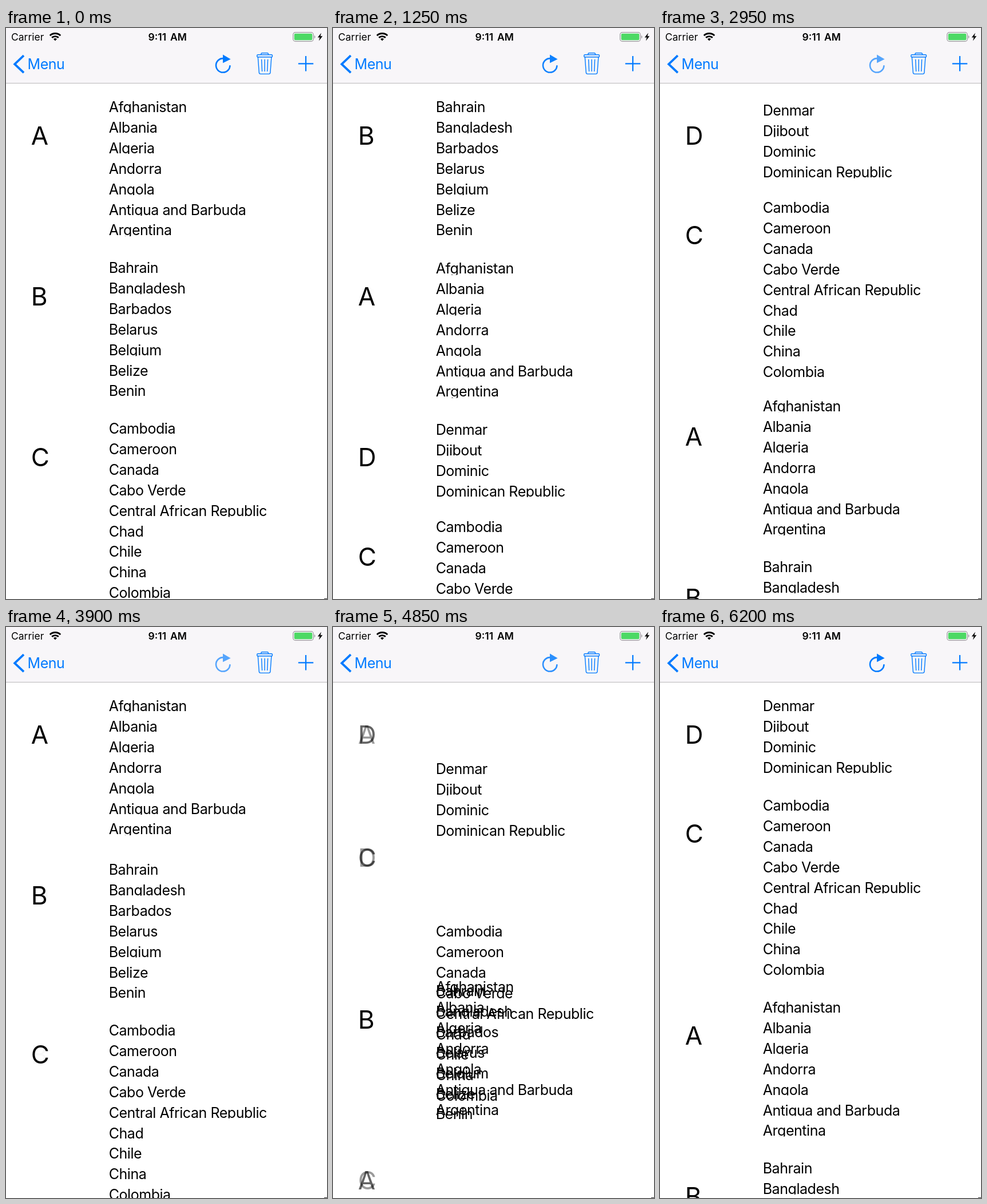
An HTML page that plays this animation: 561x998 px, repeating every 6.25 s.

```html
<!DOCTYPE html>
<html lang="en">
<head>
<meta charset="utf-8">
<title>Country list</title>
<style>
  html, body { margin: 0; width: 100%; height: 100%; overflow: hidden; background: #fff; }
  body { position: relative; color: #000; font-family: Inter, Roboto, sans-serif; }
  .section, .slot { position: absolute; top: 0; white-space: nowrap; }
  .section { left: 179.7px; }
  .section div {
    position: absolute; left: 0; height: 28.6px; overflow: hidden;
    font-size: 25px; line-height: 36px; letter-spacing: -.45px; padding-right: 2px;
  }
  .slot { left: 43.7px; font-size: 44px; line-height: 54px; }
  .slot span { position: absolute; left: 0; top: 0; }
  svg { position: absolute; left: 0; top: 0; }
</style>
</head>
<body>
<div id="table"></div>
<svg width="561" height="998" viewBox="0 0 561 998" fill="none">
  <rect width="561" height="96" fill="#f8f6f9"/>
  <rect y="96" width="561" height="1" fill="#b9b8ba"/>
  <rect x="556" y="997" width="5" height="1" fill="#333"/>

  <g fill="#000" font-size="17.5">
    <text x="9" y="21.8">Carrier</text>
    <text x="248.5" y="21.5" font-weight="600" word-spacing="2.5">9:11 AM</text>
  </g>
  <g stroke="#000" stroke-width="2.9">
    <path d="M76.8 13.2a13.2 13.2 0 0 1 18.4 0"/>
    <path d="M80.2 16.9a8.4 8.4 0 0 1 11.6 0"/>
    <path d="M83 19.3a4.4 4.4 0 0 1 6 0L86 22.5z" fill="#000" stroke="none"/>
  </g>
  <rect x="501.7" y="7.7" width="35.6" height="15.6" rx="4" stroke="#9b9b9d" stroke-width="1.2"/>
  <rect x="503.7" y="9.7" width="31.6" height="11.6" rx="2" fill="#4cd964"/>
  <path d="M538.8 12.8a3.2 3.2 0 0 1 0 5.6z" fill="#9b9b9d"/>
  <path d="M551 8.5l-6.3 8h3.7l-1.6 6 6.4-8.3h-3.8z" fill="#000"/>

  <g stroke="#007aff">
    <path d="M31 48.2L15.2 63.2L31 78.2" stroke-width="3.8"/>
    <text x="37.6" y="72" font-size="25" letter-spacing="-.5" fill="#007aff" stroke="none">Menu</text>
    <g id="refresh">
      <path d="M380 53.2A12.2 12.2 0 1 0 391.4 65.2" stroke-width="2.6"/>
      <path d="M379 46.6L392.6 54.4L379 61.2z" fill="#007aff" stroke="none"/>
    </g>
    <g stroke-width="1.4">
      <rect x="438.7" y="46.8" width="26.8" height="4" rx="1.5"/>
      <path d="M445.8 46.8v-1.3q0-1.8 1.8-1.8h9q1.8 0 1.8 1.8v1.3"/>
      <path d="M440.3 50.8l2 27q.2 2.6 2.8 2.6h14q2.6 0 2.8-2.6l2-27"/>
      <path d="M446.6 54.8l1 21.2M452.1 54.8v21.2M457.6 54.8l-1 21.2"/>
    </g>
    <path d="M510.8 62.3h26.4M524 49.1v26.4" stroke-width="2.2"/>
  </g>
</svg>
<script>
const LOOP = 6250, STEP = 50, MOVE = 300;
const ROW = 35.9, GAP = 29.9, FIRST_ROW = 120, FIRST_LETTER = 160.6;

const countries = {
  A: ["Afghanistan", "Albania", "Algeria", "Andorra", "Angola", "Antigua and Barbuda", "Argentina"],
  B: ["Bahrain", "Bangladesh", "Barbados", "Belarus", "Belgium", "Belize", "Benin"],
  C: ["Cambodia", "Cameroon", "Canada", "Cabo Verde", "Central African Republic", "Chad", "Chile", "China", "Colombia"],
  D: ["Denmar", "Djibout", "Dominic", "Dominican Republic"]
};

// Each shuffle: button press time, start of the move, resulting order.
const shuffles = [
  { press: 150, start: 260, order: "BCAD" },
  { press: 850, start: 963, order: "BADC" },
  { press: 1800, start: 1972, order: "DCAB" },
  { press: 2800, start: 2932, order: "ABCD" },
  { press: 3750, start: 3866, order: "ADBC" },
  { press: 4550, start: 4681, order: "DCBA" },
  { press: 5750, start: 5870, order: "DCAB" }
];

const table = document.getElementById("table");
const refresh = document.getElementById("refresh");

function add(parent, tag, className = "", text = "") {
  const node = parent.appendChild(document.createElement(tag));
  node.className = className;
  node.textContent = text;
  return node;
}

const sections = {};
for (const letter in countries) {
  sections[letter] = add(table, "div", "section");
  countries[letter].forEach((name, i) => {
    add(sections[letter], "div", "", name).style.top = i * ROW + "px";
  });
}

const slots = [0, 1, 2, 3].map(() => {
  const box = add(table, "div", "slot");
  return { box, before: add(box, "span"), after: add(box, "span") };
});

const clamp = x => Math.min(1, Math.max(0, x));
const mix = (a, b, p) => a + (b - a) * p;
const moveTo = (node, y) => { node.style.transform = `translateY(${y.toFixed(2)}px)`; };

// Ease-in-out, the cubic Bezier (.42, 0, .58, 1).
function ease(x) {
  let low = 0, high = 1;
  for (let i = 0; i < 20; i++) {
    const u = (low + high) / 2, v = 1 - u;
    if (1.26 * u * v * v + 1.74 * u * u * v + u * u * u < x) low = u;
    else high = u;
  }
  return low * low * (3 - 2 * low);
}

function offsets(order) {
  let y = 0;
  return [...order].map(letter => {
    const top = y;
    y += countries[letter].length * ROW + GAP;
    return top;
  });
}

function draw(time) {
  let from = "ABCD", to = from, p = 1, sincePress = Infinity;
  for (const { press, start, order } of shuffles) {
    if (time < press) break;
    from = to;
    to = order;
    sincePress = time - press;
    const x = clamp((time - start) / MOVE);
    p = x === 0 || x === 1 ? x : ease(x);
  }

  const oldTops = offsets(from), newTops = offsets(to);
  for (const letter in sections) {
    const y = mix(oldTops[from.indexOf(letter)], newTops[to.indexOf(letter)], p);
    moveTo(sections[letter], FIRST_ROW + y);
  }

  slots.forEach(({ box, before, after }, i) => {
    const same = from[i] === to[i];
    moveTo(box, FIRST_LETTER + mix(oldTops[i], newTops[i], p));
    before.textContent = from[i];
    after.textContent = to[i];
    before.style.opacity = same ? 0 : 1 - p;
    after.style.opacity = same ? 1 : p;
  });

  refresh.style.opacity = mix(.65, 1, clamp((sincePress - 150) / 300));
}

const begin = performance.now();
function tick() {
  const time = (performance.now() - begin) % LOOP;
  draw(Math.floor(time / STEP) * STEP);
  requestAnimationFrame(tick);
}
tick();
</script>
</body>
</html>
```
